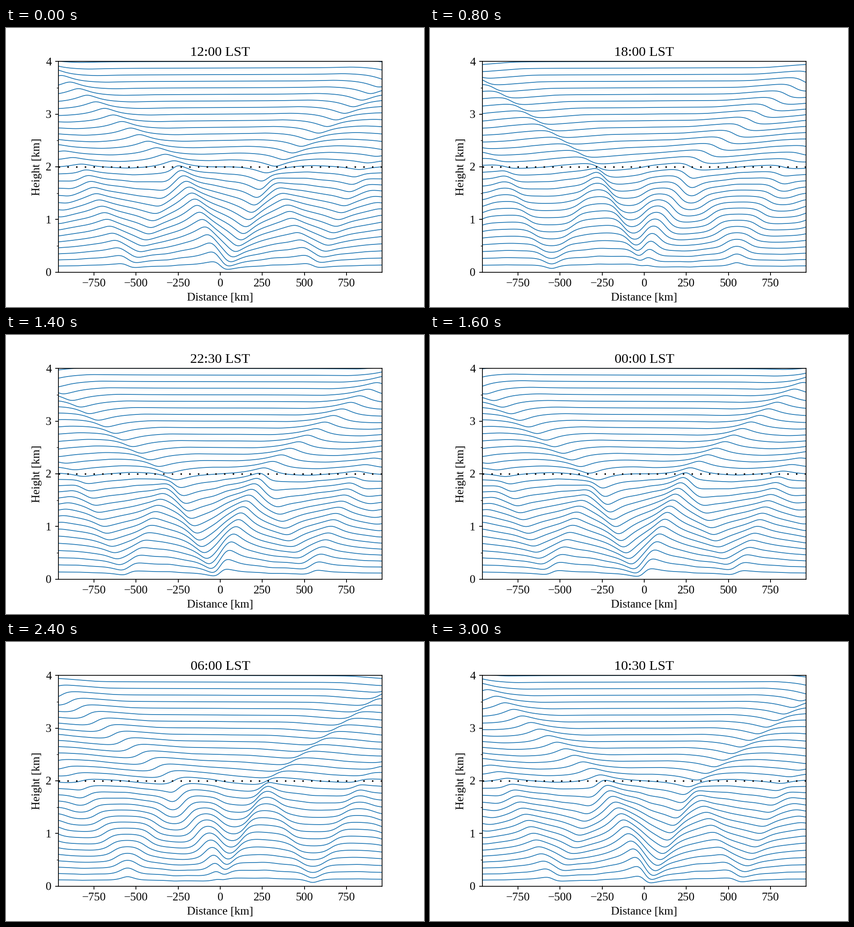
Write a matplotlib script that moves like this. It is 917 px wide and 611 px high and loops after 3200 ms.

```python
import numpy as np
import matplotlib.pyplot as plt
from matplotlib.animation import FuncAnimation
from matplotlib.ticker import MultipleLocator

plt.rcParams.update({"font.family": "Liberation Serif", "font.size": 12})

WIDTH, HEIGHT, DPI = 917, 611, 152.75
FRAMES, INTERVAL = 16, 200

# Linear diurnal gravity waves over a coast, stratification jump at z = 2 km
OMEGA = 2 * np.pi / 86400      # 1/s
N_LOW = 0.01                   # 1/s, below the interface
RATIO = 3                      # stratification above / below
Q0 = 1.2e-5                    # m/s^3, heating amplitude
Z_TOP, Z_JUMP = 4, 2           # km, heating depth is 1 km
L = N_LOW / OMEGA              # km, horizontal scale
COAST = 50 / L                 # scaled half-width of the coast
AMP = Q0 / (np.pi * N_LOW**2 * OMEGA) / 1000  # km


def displacement(x, z):
    """Complex displacement for scaled distance x and height z in km."""
    dk = 0.01
    k = np.arange(dk / 2, 45, dk)
    src = k * np.exp(-COAST * k)
    p_low = src / (1 + k**2)
    p_up = src / (1 + (RATIO * k) ** 2)

    # Matching at the interface, rigid ground, radiation aloft
    refl = (1 - RATIO) / (1 + RATIO)
    phase = np.exp(1j * k * Z_JUMP)
    gap = (p_low - p_up) * np.exp(-Z_JUMP)
    down0 = -gap * (1 + 1j * RATIO * k) / (1j * (1 + RATIO) * k)
    down = (down0 * phase - refl * p_low * phase**2) / (1 + refl * phase**2)
    up = -p_low - down
    out = (1 + refl) * up * phase + gap + down0

    zc = z[:, None]
    low = p_low * np.exp(-zc) + up * np.exp(1j * k * zc) + down * np.exp(-1j * k * zc)
    high = p_up * np.exp(-zc) + out * np.exp(1j * RATIO * k * (zc - Z_JUMP))
    modes = np.where(zc <= Z_JUMP, low, high)
    return AMP * dk * modes @ np.sin(np.outer(k, x))


x = np.linspace(-7, 7, 701)
levels = np.arange(1, 33) / 8
field = displacement(x, levels)

fig, ax = plt.subplots(figsize=((WIDTH + 1e-6) / DPI, (HEIGHT + 1e-6) / DPI), dpi=DPI)
fig.subplots_adjust(left=0.125, right=0.9, bottom=0.125, top=0.88)
ax.set(xlim=(-7 * L, 7 * L), ylim=(0, Z_TOP),
       xlabel="Distance [km]", ylabel="Height [km]")
ax.xaxis.set_major_locator(MultipleLocator(250))
ax.yaxis.set_major_locator(MultipleLocator(1))
ax.yaxis.set_minor_locator(MultipleLocator(0.5))

lines = [ax.plot(x * L, np.full_like(x, z), color="#1f77b4", lw=0.8)[0] for z in levels]
ax.plot([-7 * L, 7 * L], [Z_JUMP, Z_JUMP], color="black", lw=1.5, ls=(0, (1, 5)))
title = ax.set_title("12:00 LST")


def update(i):
    eta = np.imag(field * np.exp(2j * np.pi * i / FRAMES))
    for line, z, dz in zip(lines, levels, eta):
        line.set_ydata(z + dz)
    minutes = (720 + i * 1440 // FRAMES) % 1440
    title.set_text(f"{minutes // 60:02d}:{minutes % 60:02d} LST")
    return [*lines, title]


anim = FuncAnimation(fig, update, frames=FRAMES, interval=INTERVAL,
                     repeat=True, repeat_delay=0, blit=False)
plt.show()
```
